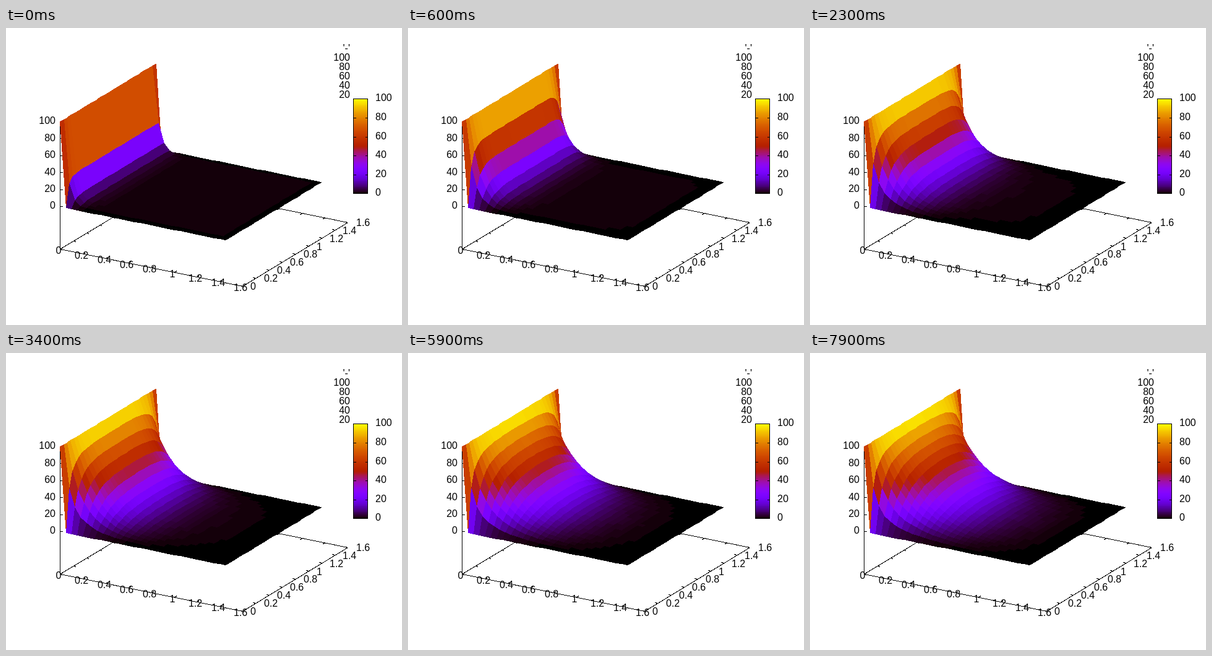
An HTML page for the animation above (8000 ms loop, 640 by 480 pixels).

```html
<!DOCTYPE html>
<html>
<head>
<meta charset="utf-8">
<style>
html, body { margin: 0; height: 100%; overflow: hidden; background: #fff; }
svg { display: block; }
text { font: 16px "Liberation Sans", Arial, sans-serif; }
</style>
</head>
<body>
<svg id="stage" width="640" height="480" viewBox="0 0 640 480"></svg>
<script>
const SIZE = 30, FRAMES = 80, STEP = 100, LEVELS = 168;
const stage = document.getElementById('stage');

function add(parent, tag, attrs, content) {
  const el = document.createElementNS('http://www.w3.org/2000/svg', tag);
  for (const key in attrs) el.setAttribute(key, attrs[key]);
  if (content !== undefined) el.textContent = content;
  parent.appendChild(el);
  return el;
}

const label = (x, y, value, anchor) =>
  add(stage, 'text', { x: Math.round(x), y: Math.round(y), 'text-anchor': anchor }, value);

// Grid units (32 per axis) and height to screen
const project = (x, y, z) => [
  Math.round(87.4 + 9.21 * x + 5.32 * y),
  Math.round(288.4 + 1.86 * x - 3.22 * y - 1.374 * z)
];

function color(value) {
  const g = Math.min(LEVELS - 1, Math.floor(value / 100 * LEVELS)) / (LEVELS - 1);
  const rgb = [Math.sqrt(g), g ** 3, Math.max(0, Math.sin(2 * Math.PI * g))];
  return `rgb(${rgb.map(c => Math.round(255 * c))})`;
}

const plot = add(stage, 'g', { transform: 'translate(.5 .5)', 'shape-rendering': 'crispEdges' });
const line = (a, b) =>
  add(plot, 'line', { x1: a[0], y1: a[1], x2: b[0], y2: b[1], stroke: '#000' });
const tick = (p, dx, dy) => line(p, [p[0] + dx, p[1] + dy]);

// Axes, ticks and labels
const corners = [[0, 0], [32, 0], [32, 32], [0, 32]].map(([x, y]) => project(x, y, -50));
corners.forEach((p, i) => line(p, corners[(i + 1) % 4]));
line(project(0, 0, 100), corners[0]);

for (let i = 0; i <= 8; i++) {
  const name = +(i * 0.2).toFixed(1);
  tick(project(4 * i, 0, -50), 4, -2);
  tick(project(4 * i, 32, -50), -4, 2);
  tick(project(32, 4 * i, -50), -4, -1);
  tick(project(0, 4 * i, -50), 4, 1);
  label(85 + 36.8 * i, 365.4 + 7.44 * i, name, 'middle');
  label(395.4 + 21.28 * i, 422.9 - 12.88 * i, name, 'start');
}
for (let z = 0; z <= 100; z += 20) {
  tick(project(0, 0, z), 4, 0);
  label(80, 292.3 - 1.37 * z, z, 'end');
  label(597, 271.4 - 1.53 * z, z, 'start');
  if (z) label(556, 128 - 0.75 * z, z, 'end');
}
label(556, 38, "'-'", 'end');

// Colour box
for (let i = 0; i < 153; i++)
  add(plot, 'rect', { x: 561.5, y: 266.5 - i, width: 23, height: 1, fill: color(i / 1.53) });
add(plot, 'rect', { x: 561, y: 114, width: 23, height: 153, fill: 'none', stroke: '#000' });
for (let z = 20; z < 100; z += 20) {
  const y = Math.round(267.4 - 1.53 * z);
  tick([561, y], 4, 0);
  tick([584, y], -4, 0);
}

// Surface cells, far to near; the outline covers the border pixels
const cells = [];
for (let x = 0; x < SIZE - 1; x++)
  for (let y = SIZE - 2; y >= 0; y--)
    cells.push({ x, y, el: add(plot, 'polygon', { 'stroke-linejoin': 'bevel' }) });

// Relaxation of a plate with one hot edge, one in-place sweep per step
const LAST = SIZE - 1;
let grid = Array.from({ length: SIZE }, (_, x) =>
  Array.from({ length: SIZE }, (_, y) =>
    x === 0 ? 100 : x === LAST || y === 0 || y === LAST ? 0 : 1));
const states = [];
for (let n = 0; n < FRAMES; n++) {
  grid = grid.map(row => row.slice());
  for (let x = 1; x < LAST; x++)
    for (let y = 1; y < LAST; y++)
      grid[x][y] = (grid[x - 1][y] + grid[x + 1][y] + grid[x][y - 1] + grid[x][y + 1]) / 4;
  states.push(grid);
}

function draw(u) {
  for (const { x, y, el } of cells) {
    const quad = [[x, y], [x + 1, y], [x + 1, y + 1], [x, y + 1]];
    const fill = color(quad.reduce((sum, [i, j]) => sum + u[i][j], 0) / 4);
    el.setAttribute('points', quad.map(([i, j]) => project(i, j, u[i][j])).join(' '));
    el.setAttribute('fill', fill);
    el.setAttribute('stroke', fill);
  }
}

let shown = -1;
function update() {
  const n = Math.floor(performance.now() / STEP) % FRAMES;
  if (n !== shown) draw(states[shown = n]);
  requestAnimationFrame(update);
}
update();
</script>
</body>
</html>
```
